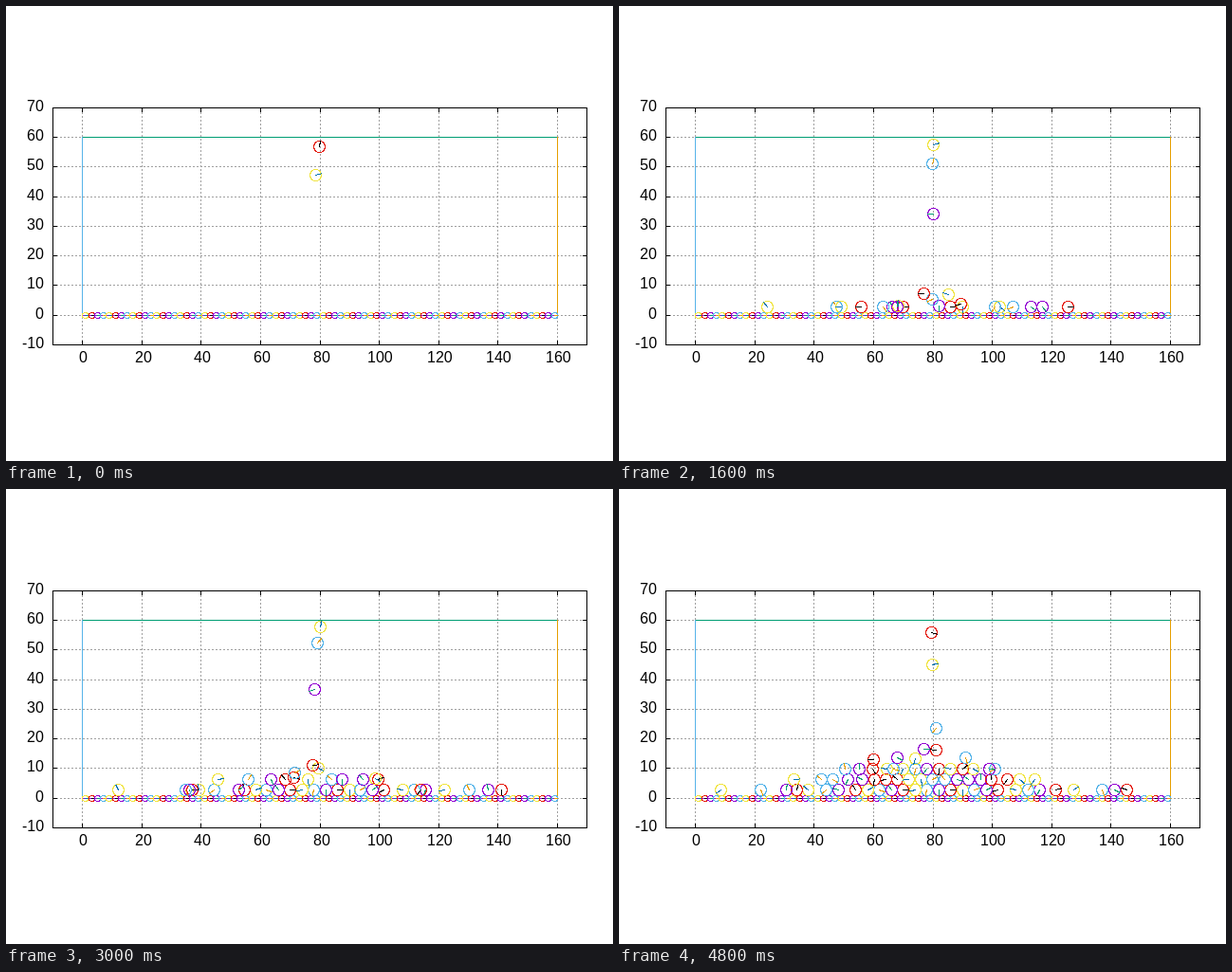
Write an HTML page with a canvas that moves like this. It is 640x480 px and loops after 4.9 s.

```html
<!DOCTYPE html>
<html lang="en">
<head>
<meta charset="utf-8">
<title>Falling discs</title>
<style>
html, body { margin: 0; width: 100%; height: 100%; overflow: hidden; background: #fff; }
canvas { display: block; }
</style>
</head>
<body>
<canvas id="stage" width="640" height="480"></canvas>
<script>
const ctx = document.getElementById('stage').getContext('2d');
const FRAMES = 49, STEP = 100;
const DROP_RATE = 1.42;         // discs per frame
const HALF_G = 10.24;           // half of gravity, units per frame squared
const TOP = { x: 80, y: 57.7 }; // where discs enter

// rim and spoke colours, in the order the discs are dropped
const STYLES = [
  ['#f0e442', '#0072b2'],
  ['#e51e10', '#000000'],
  ['#9400d3', '#009e73'],
  ['#56b4e9', '#e69f00']
];

const steps = (from, to) => Array.from({ length: (to - from) / 4 + 1 }, (_, i) => from + 4 * i);

// The heap: a packed core every four units, with stragglers at the edges.
// Each layer is filled in stride order.
const LAYERS = [
  { y: 2.83, stride: 11, xs: [8, 20, ...steps(30, 38), 44, 48, ...steps(54, 102), 108, 112, 116, 122, 128, ...steps(138, 146)] },
  { y: 6.2, stride: 7, xs: [32, 41, 46, 51, ...steps(56, 100), 105, 110, 115] },
  { y: 9.7, stride: 5, xs: [49, 53, ...steps(58, 94), 103.5, 107.5] },
  { y: 13, stride: 1, xs: [46, 64, 101, 72, 83, 77, 80, 80, 80] }
];
const slots = LAYERS.flatMap(({ y, stride, xs }) =>
  xs.map((_, i) => ({ x: xs[i * stride % xs.length], y })));

let seed = 7;
function random() {
  seed = (seed * 16807) % 2147483647;
  return seed / 2147483647;
}

const discs = slots.map((slot, id) => ({
  slot,
  style: id % 4,
  born: (id - 1) / DROP_RATE - 0.3,
  drift: 3 * (random() - 0.5),
  turn: 360 * random()
}));

// Free fall, then a damped bounce while rolling out to the resting slot
function pose({ slot, drift, turn }, age) {
  const fall = Math.sqrt((TOP.y - slot.y) / HALF_G);
  let x = TOP.x + drift * Math.min(age, fall);
  let y = TOP.y - HALF_G * age * age;
  if (age > fall) {
    const t = age - fall, away = x - slot.x;
    const slowing = 0.6 + 0.14 * Math.abs(away);
    x = slot.x + away * Math.exp(-t / slowing);
    y = slot.y + 8 * Math.exp(-0.8 * t) * Math.abs(Math.sin(1.6 * t));
  }
  const roll = (x - TOP.x) / 2 * 180 / Math.PI;
  return { x, y, angle: turn - roll };
}

// Hard-edged drawing
function dot(x, y) { ctx.fillRect(Math.round(x), Math.round(y), 1, 1); }
function bar(x, y, w, h, color) { ctx.fillStyle = color; ctx.fillRect(x, y, w, h); }

function drawDisc(x, y, r, deg, [rim, spoke]) {
  const cx = Math.round(x), cy = Math.round(y);
  ctx.fillStyle = rim;
  for (let a = 0; a < 360; a += 4) {
    const t = a * Math.PI / 180;
    dot(cx + r * Math.cos(t), cy + r * Math.sin(t));
  }
  const t = deg * Math.PI / 180;
  ctx.fillStyle = spoke;
  for (let i = 0; i <= r; i += 0.5) dot(cx + i * Math.cos(t), cy - i * Math.sin(t));
}

const sx = x => 49 + (x + 10) * 563 / 180;
const sy = y => 357 - (y + 10) * 250 / 80;
const px = x => Math.round(sx(x));
const py = y => Math.ceil(sy(y) - 0.5);

function drawAxes() {
  ctx.font = '16px "Liberation Sans", Arial, sans-serif';
  for (let v = 0; v <= 160; v += 20) {
    const x = px(v);
    for (let y = 357; y > 107; y -= 4) bar(x, y - 1, 1, 2, '#a0a0a0');
    bar(x, 107, 1, 5, '#000');
    bar(x, 353, 1, 5, '#000');
    ctx.fillText(v, Math.round(x + 1.5 - ctx.measureText(v).width / 2), 376);
  }
  for (let v = -10; v <= 70; v += 10) {
    const y = py(v);
    if (v > -10 && v < 70) for (let x = 49; x < 612; x += 4) bar(x, y, 2, 1, '#a0a0a0');
    bar(49, y, 5, 1, '#000');
    bar(608, y, 5, 1, '#000');
    ctx.fillText(v, Math.round(40 - ctx.measureText(v).width), y + 4);
  }
  bar(49, 107, 564, 1, '#000');
  bar(49, 357, 564, 1, '#000');
  bar(49, 107, 1, 251, '#000');
  bar(612, 107, 1, 251, '#000');
}

function drawBox() {
  const left = px(0), right = px(160), top = py(60), floor = py(0);
  bar(left, floor, right - left + 1, 1, '#9400d3');
  bar(left, top, right - left + 1, 1, '#009e73');
  bar(left, top, 1, floor - top + 1, '#56b4e9');
  bar(right, top, 1, floor - top + 1, '#e69f00');
  for (let i = 0; i < 80; i++) drawDisc(sx(1 + 2 * i), floor, 3, 0, STYLES[i % 4]);
}

function draw(now) {
  const frame = Math.floor(now / STEP) % FRAMES;
  bar(0, 0, 640, 480, '#fff');
  drawAxes();
  drawBox();
  for (const d of discs) {
    if (d.born > frame) break;
    const p = pose(d, frame - d.born);
    drawDisc(sx(p.x), sy(p.y), 6, p.angle, STYLES[d.style]);
  }
}

const start = performance.now();
function tick() {
  draw(performance.now() - start);
  requestAnimationFrame(tick);
}
tick();
</script>
</body>
</html>
```
